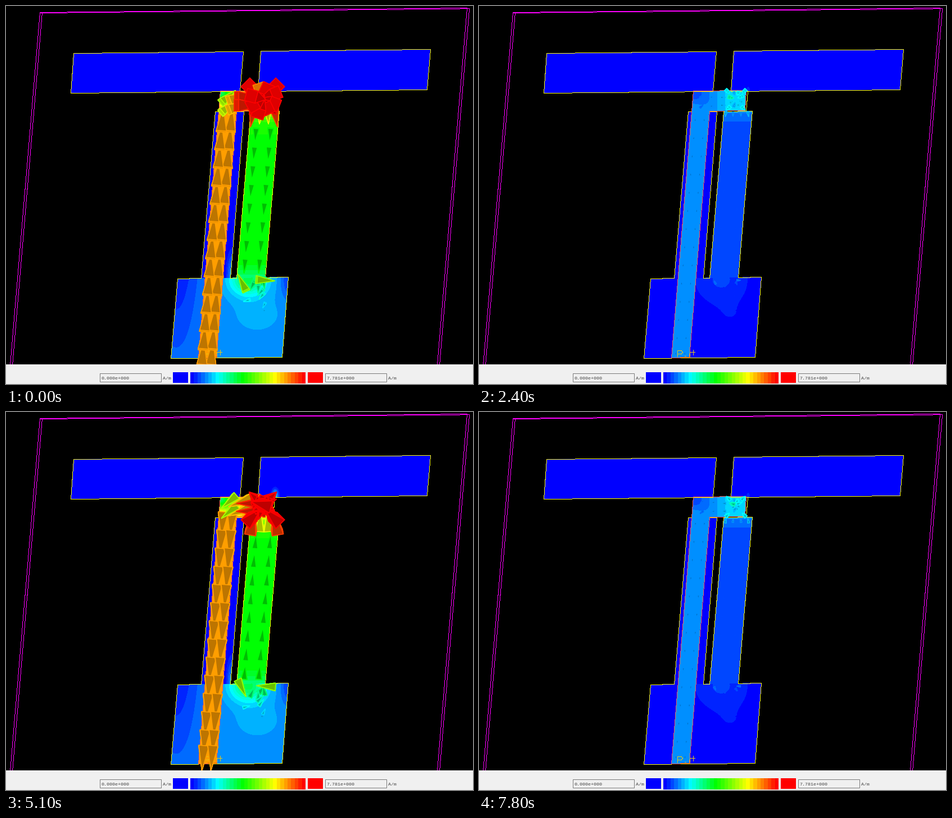
Recreate the animation shown at these times as a matplotlib script. Size 831 px wide and 674 px high, loop 8000 ms.

```python
import numpy as np
import matplotlib.pyplot as plt
from matplotlib.animation import FuncAnimation
from matplotlib.collections import PolyCollection
from matplotlib.colors import to_rgba
from matplotlib.patches import Rectangle
from matplotlib.path import Path

W, H, DPI = 831, 674, 100
PX = 72 / DPI
BANDS = 32
FEED, STRIP = 0.834, 0.472          # peak field on the two long strips
YELLOW, MAGENTA, GOLD = "#ffff00", "#ff00ff", "#e6c814"

fig = plt.figure(figsize=(W / DPI, H / DPI), dpi=DPI, facecolor="black")
ax = fig.add_axes([0, 0, 1, 1])
ax.axis("off")


def picture(data, extent, z):
    return ax.imshow(data, extent=extent, interpolation="nearest", aspect="auto", zorder=z)


def color(v):
    """Banded blue-cyan-green-yellow-red scale."""
    p = np.clip(np.floor(np.asarray(v) * BANDS), 0, BANDS - 1) / (BANDS - 1)
    stops = [0, 0.23, 0.455, 0.74, 1]
    return np.stack([np.interp(p, stops, [0, 0, 0, 1, 1]),
                     np.interp(p, stops, [0, 1, 1, 1, 0]),
                     np.interp(p, stops, [1, 1, 0, 0, 0])], axis=-1)


wires = np.zeros((H, W, 4))


def line(points, col, closed=False):
    """Hard one-pixel polyline."""
    pts = np.array(list(points) + ([points[0]] if closed else []), float)
    for a, b in zip(pts[:-1], pts[1:]):
        n = int(np.abs(b - a).max()) + 2
        x, y = np.rint(np.linspace(a, b, n)).astype(int).T
        wires[np.clip(y, 0, H - 1), np.clip(x, 0, W - 1)] = to_rgba(col)


# ---- geometry ----
left_bar = [(120, 84), (422, 81), (416, 152), (115, 155)]
right_bar = [(453, 80), (755, 77), (749, 149), (448, 152)]
slot = [(372, 188), (423, 188), (399, 485), (347, 485)]
strip = [(435, 188), (486, 187), (461, 484), (410, 485)]
patch = [(305, 486), (502, 483), (491, 626), (293, 628)]
feed = [(381, 151), (475, 150), (473, 186), (410, 187), (374, 626), (342, 627)]

for bar in (left_bar, right_bar):
    ax.add_patch(plt.Polygon(bar, fc="#0000ff", ec="none", zorder=1))
    line(bar, YELLOW, closed=True)
line([(410, 188), slot[1], slot[2], strip[3], strip[0], strip[1], strip[2],
      patch[1], patch[2], patch[3], patch[0], slot[3], slot[0], (378, 188)], YELLOW)
line([(478, 151), (475, 187)], YELLOW)
line(feed, "#ff5a50", closed=True)

for shift in (0, 4):
    line([(60 + shift, 11), (7 + shift, 640)], MAGENTA)
    line([(820 + shift, 3 + shift / 2), (767 + shift, 640)], MAGENTA)
    line([(60, 11 + shift / 4), (820 + shift, 3 + shift / 3)], MAGENTA)

# port label
line([(353, 625), (353, 614), (360, 614), (362, 617), (360, 620), (353, 620)], GOLD)
line([(366, 624), (368, 624)], GOLD)
line([(359, 626), (375, 626)], "#ff2000")
line([(375, 625), (375, 617), (384, 617)], GOLD)
line([(381, 613), (381, 622)], GOLD)

# ---- scalar field at unit amplitude ----
X0, X1, Y0, Y1 = 290, 506, 125, 639
gx, gy = np.meshgrid(np.arange(X0, X1) + 0.5, np.arange(Y0, Y1) + 0.5)


def inside(poly):
    pts = np.column_stack([gx.ravel(), gy.ravel()])
    return Path(poly).contains_points(pts).reshape(gx.shape)


def bump(cx, cy, sx, sy):
    return np.exp(-((gx - cx) / sx) ** 2 - ((gy - cy) / sy) ** 2)


def ramp(v, a, b):
    t = np.clip((v - a) / (b - a), 0, 1)
    return t * t * (3 - 2 * t)


def build_field():
    field = np.full(gx.shape, np.nan)
    height = (628 - gy) / 142
    patch_v = (0.148 - 0.11 * np.exp(-((gx - 303) / 44) ** 2) * (0.4 + 0.6 * height)
               + 0.024 * bump(447, 548, 40, 32) - 0.08 * bump(502, 490, 13, 32)
               + 0.25 * bump(431, 488, 31, 27))
    strip_v = (STRIP - 0.17 * ramp(gy, 445, 510)
               + 0.3 * np.exp(-np.maximum(gy - 188, 0) / 9))
    arm = 0.33 + 0.8 * np.clip((gx - 381) / 65, 0, 1)
    turn = np.where(gx < 412, ramp(gy - 0.4 * (gx - 381), 152, 186), 0)
    feed_v = np.where(gy > 186, FEED, arm + (FEED - arm) * turn)
    halo = 0.22 * bump(479, 150, 6, 12)
    for poly, values in ((right_bar, halo), (patch, patch_v),
                         (slot, 0.16 * bump(402, 486, 9, 42)),
                         (strip, strip_v), (feed, feed_v)):
        mask = inside(poly)
        field[mask] = values[mask]
    return field


field = build_field()
visible = ~np.isnan(field)
field = np.nan_to_num(field)
field_img = picture(np.zeros(field.shape + (4,)), (X0, X1, Y1, Y0), 2)
picture(wires, (0, W, H, 0), 3)

# ---- arrows: (x, y, angle, strength, tilt), y axis pointing down ----
rng = np.random.default_rng(4)


def strip_x(x_top, y):
    return x_top - 0.083 * (y - 188)


def long_strips():
    rows = [min(201.5 + 32.4 * i, 618) for i in range(14)]
    feed_rows = [(strip_x(394 + s, y), y, 94.7, FEED, 8) for y in rows for s in (-8, 8)]
    rows = [230.5 + 33.3 * i for i in range(8)]
    return feed_rows + [(strip_x(460.5 + s, y), y, -85.2, STRIP, 6)
                        for y in rows for s in (-13, 13)]


def bend():
    """Current turning from the arm down into the feed."""
    return [(396 + 38 * t, 170 + s * (9 - 2 * t), 140 + 40 * t, 0.66 + 0.3 * t + 0.006 * s, 22)
            for t in (0, 0.5, 1) for s in (-1, 1)]


def strip_mouth():
    return [(459 + 20 * t, 193, -90 - 10 * t, 0.68 + 0.25 * t * t, 25)
            for t in (-0.35, 0.35, -1, 1)]


def junction():
    corners = [(457 + 14 * sx, 168 + 15 * sy, np.degrees(np.arctan2(-1, -sx * sy)), 1.35, 57)
               for sy in (1, -1) for sx in (-1, 1)]
    burst = [(457 + 8 * np.cos(t), 166 + 10 * np.sin(t), np.degrees(t),
              rng.uniform(0.7, 1.6), rng.uniform(45, 72))
             for t in np.linspace(-1.9, 3.4, 8)]
    return corners + burst


def spread():
    """Flow fanning out where the strip meets the patch."""
    small = [(432 + rng.uniform(-28, 28), 493 + 50 * t, rng.uniform(-110, 10),
              0.38 - 0.22 * t, 25) for t in np.linspace(0, 1, 9) ** 1.5]
    return small + [(441 + 21 * s, 491 - 2 * s, -116 - 60 * s + 120 * (s < 0) + 360 * (s > 0),
                     0.62, 12) for s in (-1, 1)]


columns = long_strips()
others = spread() + bend() + strip_mouth() + junction()


def pyramid(x, y, angle, strength, tilt, sign):
    """Faces of one square pyramid, far to near, with fill and edge colours."""
    size = min(strength * abs(sign), 1)
    half, r = 27 * size, 11 * size
    a, t = np.radians(angle), np.radians(tilt)
    u = np.array([np.cos(t) * np.cos(a), np.cos(t) * np.sin(a), np.sin(t)])
    u *= np.sign(sign)
    side = np.array([-np.sin(a), np.cos(a), 0])
    up = np.cross(u, side)
    center = np.array([x, y, 0])
    apex = center + half * u
    base = [center - half * u + r * (i * side + j * up)
            for i, j in ((-1, -1), (1, -1), (1, 1), (-1, 1))]
    faces = [(np.array(base), 0.87)]
    for i in range(4):
        tri = np.array([base[i], base[(i + 1) % 4], apex])
        faces.append((tri, 0.74 if i % 2 == 0 else 0.96))
    faces.sort(key=lambda f: f[0][:, 2].mean())
    rgb = color(size)
    return [(f[:, :2], rgb * shade, rgb) for f, shade in faces]


arrows = PolyCollection([], linewidths=1.5 * PX, zorder=5)
ax.add_collection(arrows)

# ---- legend panel ----
ax.add_patch(Rectangle((0, 639), W, H - 639, fc="#f0f0f0", ec="none", zorder=8))


def label(x, text):
    ax.text(x, 666, text, family="Liberation Mono", fontsize=8.4 * PX,
            color="#484848", va="baseline", zorder=10)


def value_box(x, text):
    ax.add_patch(Rectangle((x + 0.5, 654.5), 109, 15, fc="#f0f0f0", ec="#7a7a7a",
                           lw=PX, zorder=9))
    label(x + 3, text)
    label(x + 113, "A/m")


value_box(166, "0.000e+000")
value_box(567, "7.781e+000")
for x, col in ((297, "#0000ff"), (537, "#ff0000")):
    ax.add_patch(Rectangle((x, 653), 27, 19, fc=col, ec="none", zorder=9))
picture(color((np.arange(BANDS) + 0.5) / BANDS)[None], (328, 533, 673, 653), 9)
ax.set_xlim(0, W)
ax.set_ylim(H, 0)


def draw(frame):
    # One phase step is 10 degrees; the first is held twice as long.
    step = max(0, frame // 3 - 1)
    sign = np.cos(np.radians(10 * (step - 17.05)))
    field_img.set_data(np.dstack([color(field * abs(sign)), visible]))
    ordered = columns if sign > 0 else columns[::-1]
    faces = [f for cone in ordered + others for f in pyramid(*cone, sign)]
    verts, fills, edges = zip(*faces)
    arrows.set_verts(verts)
    arrows.set_facecolor(fills)
    arrows.set_edgecolor(edges)
    return field_img, arrows


anim = FuncAnimation(fig, draw, frames=80, interval=100, repeat=True,
                     repeat_delay=0, blit=False)
plt.show()
```
